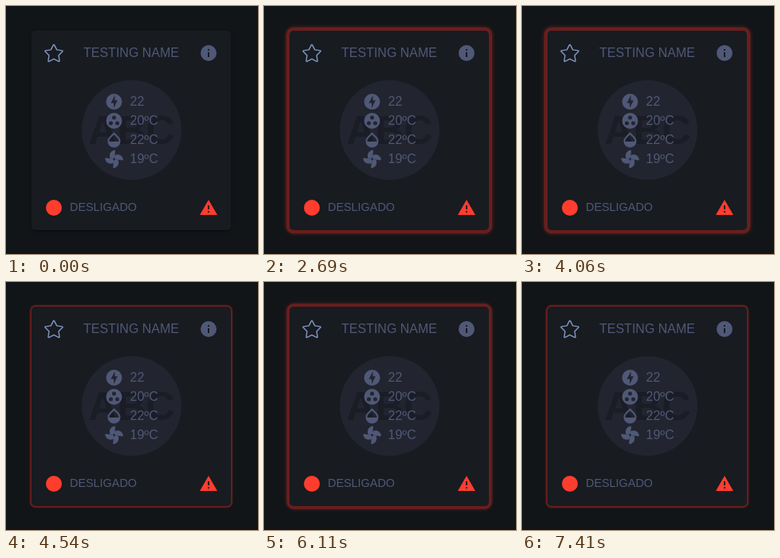
Animation, 316 px wide and 311 px high, one loop 7430 ms. Source, as an HTML page:

```html
<!DOCTYPE html>
<html lang="pt">
<head>
<meta charset="utf-8">
<style>
html, body { margin: 0; width: 100%; height: 100%; overflow: hidden; background: #111518; }
#card { position: absolute; left: 32px; top: 31px; width: 250px; height: 250px; border-radius: 5px; background: #181b20; }
svg { position: absolute; left: 0; top: 0; font: 16px "Liberation Sans", Arial, sans-serif; fill: #505877; fill-rule: evenodd; }
.red { fill: #ff3d2e; }
</style>
</head>
<body>
<div id="card"></div>
<svg width="316" height="311" viewBox="0 0 316 311">
  <path id="edge" d="M45 30.5H270M45 281.5H270M31.5 43V270M282.5 43V270" fill="none" stroke="#962723"/>
  <path id="star" fill="none" stroke="#8198c4" stroke-width="1.4" stroke-linejoin="round"/>
  <text x="157" y="64" text-anchor="middle">TESTING NAME</text>
  <path transform="translate(242 47)" d="M13 9h-2V7h2zm0 8h-2v-6h2zM12 2a10 10 0 1 0 0 20a10 10 0 1 0 0-20z"/>

  <circle cx="157.5" cy="155.5" r="62.5" fill="#22252f"/>
  <text x="157.5" y="173" text-anchor="middle" font-size="50" font-weight="bold" fill="#1a1d25">ABC</text>
  <path transform="translate(123.5 108)" d="M12 2a10 10 0 1 0 0 20a10 10 0 1 0 0-20zM11.5 20v-6.3H8L13 4v6.3h3.4z"/>
  <path transform="translate(123.5 132)" d="M12 2a10 10 0 1 0 0 20a10 10 0 1 0 0-20zM8 12.5a2.5 2.5 0 1 1 0 5a2.5 2.5 0 1 1 0-5zM12 5.5a2.5 2.5 0 1 1 0 5a2.5 2.5 0 1 1 0-5zM16 12.5a2.5 2.5 0 1 1 0 5a2.5 2.5 0 1 1 0-5z"/>
  <path transform="translate(123.5 156)" d="M17.7 8L12 2.3 6.3 8a8 8 0 1 0 11.4 0zM6 14c0-2 .6-3.3 1.8-4.4L12 5.3l4.2 4.3C17.4 10.8 18 12 18 14z"/>
  <g id="fan" transform="translate(135.6 192) scale(.044)"></g>
  <text x="155.5" y="125">22</text>
  <text x="155.5" y="149">20ºC</text>
  <text x="155.5" y="173">22ºC</text>
  <text x="155.5" y="197">19ºC</text>

  <circle class="red" cx="60" cy="253" r="10"/>
  <text x="80" y="257" font-size="14.4">DESLIGADO</text>
  <path class="red" transform="translate(242 241)" d="M13 14h-2V9h2zm0 4h-2v-2h2zM1 21h22L12 2z"/>
</svg>
<script>
const LOOP = 7430, START = 1760, PULSE = 1408, RISE = 480, FALL = 690, PEAK = 5.5;
const $ = id => document.getElementById(id);

// Star with rounded tips
const polar = (r, step) => {
  const a = (step / 5 - .5) * Math.PI;
  return [60 + r * Math.cos(a), 60 + r * Math.sin(a)];
};
const mix = (p, q, k) => p.map((v, i) => v + (q[i] - v) * k);
let path = '';
for (let i = 0; i < 10; i += 2) {
  const tip = polar(12.4, i), before = polar(6.3, i - 1), after = polar(6.3, i + 1);
  path += `${i ? 'L' : 'M'}${before}L${mix(before, tip, .8)}Q${tip} ${mix(after, tip, .8)}`;
}
$('star').setAttribute('d', path + 'Z');

// Four equal blades around an open hub
const blade = 'M0-32L19-115L32-238C33-249 24-257 13-256C-66-246-128-178-128-97C-128-68-123-42-115-19L-32 0A32 32 0 0 1 0-32Z';
$('fan').innerHTML = [0, 90, 180, 270].map(a => `<path d="${blade}" transform="rotate(${a})"/>`).join('');

function spread(t) {
  const n = Math.floor(t / PULSE), p = t % PULSE, low = n ? 1.5 : 1;
  if (p < RISE) return low + (PEAK - low) * (1 - (1 - p / RISE) ** 2.5);
  return p < FALL ? PEAK : PEAK - (PEAK - 1.5) * (p - FALL) / (PULSE - FALL);
}

function draw(now) {
  const t = now % LOOP - START, on = t >= 0, s = on ? spread(t) : 0;
  $('card').style.boxShadow = on
    ? `0 0 0 ${s}px #671f1e, 0 0 ${1.3 * s}px ${s}px rgba(255,59,48,.32)`
    : '0 2px 2px rgba(0,0,0,.14), 0 1px 5px rgba(0,0,0,.12), 0 3px 1px -2px rgba(0,0,0,.2)';
  $('edge').style.display = s > 4.6 && t % PULSE < FALL ? '' : 'none';
}

const begin = performance.now();
function tick() {
  draw(performance.now() - begin);
  requestAnimationFrame(tick);
}
tick();
</script>
</body>
</html>
```
